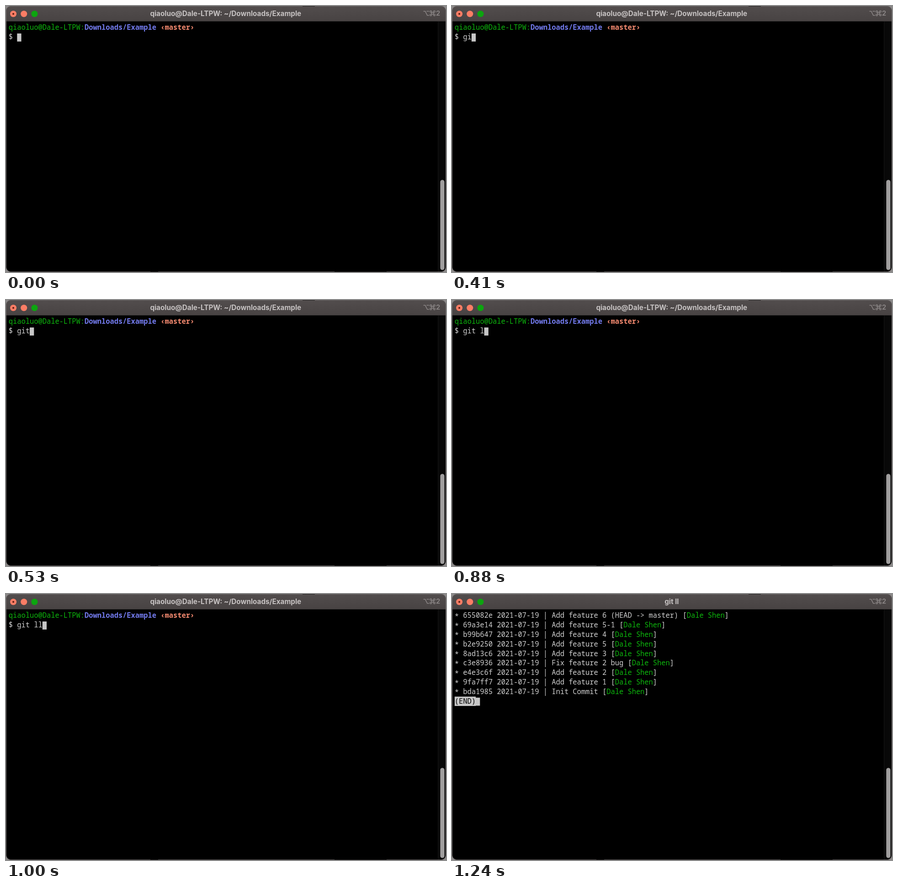
These frames come from a looping animation (963 by 582 pixels, 8000 ms). An HTML page:

```html
<!DOCTYPE html>
<html lang="en">
<head>
<meta charset="utf-8">
<title>Terminal</title>
<style>
  html, body { margin: 0; width: 100%; height: 100%; overflow: hidden; background: #8b8888; }
  svg { display: block; width: 963px; height: 582px; }
  .mono { font: 15.4px "Noto Sans Mono", "DejaVu Sans Mono", monospace; fill: #d0d0d0; white-space: pre; }
  .title { font: 700 15.25px Inter, "Liberation Sans", sans-serif; fill: #c6c2c2; text-anchor: middle; }
  .hint { font: 600 15px Inter, "Liberation Sans", sans-serif; fill: #8d8888; }
  .green { fill: #0db60d; }
  .blue { fill: #737bee; font-weight: 700; }
  .coral { fill: #f58a70; font-weight: 700; }
  .dark { fill: #000; }
  .block { fill: #c7c7c7; }
</style>
</head>
<body>
<svg viewBox="0 0 963 582">
  <defs>
    <linearGradient id="bar" x2="0" y2="1">
      <stop stop-color="#524d4d"/>
      <stop offset="1" stop-color="#484343"/>
    </linearGradient>
    <clipPath id="win"><rect x="0.5" y="0.5" width="962" height="581" rx="10"/></clipPath>
  </defs>
  <g clip-path="url(#win)">
    <rect width="963" height="582" fill="#000"/>
    <rect width="963" height="33" fill="url(#bar)"/>
    <rect y="33" width="963" height="1" fill="#2b2828"/>
    <rect x="945.5" y="34" width="1" height="548" fill="#242424"/>
    <rect x="946.5" y="34" width="16" height="548" fill="#080808"/>
  </g>
  <rect x="0.5" y="0.5" width="962" height="581" rx="10" fill="none" stroke="#686464"/>
  <path d="M649 0.5H676M316 581.5H333M719 581.5H833" stroke="#262424"/>
  <rect x="950.4" y="380.5" width="9.2" height="197" rx="4.6" fill="#a09e9e"/>
  <circle cx="16" cy="17.3" r="7" fill="#fb7d65"/>
  <circle cx="16" cy="17.3" r="2" fill="#5c1a12"/>
  <circle cx="39.2" cy="17.3" r="7" fill="#fb7d65"/>
  <circle cx="62.4" cy="17.3" r="7" fill="#0ca50f"/>
  <g fill="none" stroke="#8d8888" stroke-width="1.6">
    <path d="M913.5 11.5H917.5L922 20.5H926M920.5 11.5H926"/>
    <path d="M931.5 13.7H935.7V17.9H931.5ZM931.5 13.7H929.8A1.8 1.8 0 1 1 931.5 12ZM935.7 13.7V12A1.8 1.8 0 1 1 937.4 13.7ZM935.7 17.9H937.4A1.8 1.8 0 1 1 935.7 19.6ZM931.5 17.9V19.6A1.8 1.8 0 1 1 929.8 17.9Z" stroke-width="1.4"/>
  </g>
  <text class="hint" x="941" y="21.2">2</text>
  <text class="title" id="title" x="480.8" y="22"></text>
  <g id="screen"></g>
</svg>
<script>
const LOOP = 8000, LEFT = 5.8, COL = 9.24, ROW = 20.83;
const USER = "qiaoluo@Dale-LTPW", AUTHOR = "Dale Shen";

const title = document.getElementById("title");
const screen = document.getElementById("screen");

const span = (cls, text) => `<tspan class="${cls}">${text}</tspan>`;
const line = (row, body) =>
  `<text class="mono" x="${LEFT}" y="${(52.2 + row * ROW).toFixed(2)}">${body}</text>`;
const cursor = (col, row) =>
  `<rect class="block" x="${(LEFT + col * COL).toFixed(2)}" y="${(39.3 + row * ROW).toFixed(2)}" width="${COL}" height="17.6"/>`;

const prompt = line(0, span("green", USER + ":") + span("blue", "Downloads/Example") +
  " " + span("coral", "‹master›"));

const commits = [
  ["655082e", "Add feature 6 (HEAD -&gt; master)"],
  ["69a3e14", "Add feature 5-1"],
  ["b99b647", "Add feature 4"],
  ["b2e9250", "Add feature 5"],
  ["8ad13c6", "Add feature 3"],
  ["c3e8936", "Fix feature 2 bug"],
  ["e4e3c6f", "Add feature 2"],
  ["9fa7ff7", "Add feature 1"],
  ["bda1985", "Init Commit"]
];

function shell(typed, entered) {
  return prompt + line(1, "$ " + typed) +
    (entered ? cursor(0, 2) : cursor(2 + typed.length, 1));
}

function log() {
  const rows = commits.map(([hash, note], i) =>
    line(i, `<tspan dy="2.6">*</tspan><tspan dy="-2.6"> ${hash}</tspan> 2021-07-19 | ${note} [${span("green", AUTHOR)}]`));
  const end = '<rect class="block" x="5.8" y="224.5" width="46.2" height="20.5"/>' +
    line(9, span("dark", "(END)")) + cursor(5, 9);
  return rows.join("") + end;
}

const home = USER + ": ~/Downloads/Example";
const steps = [
  [0, home, shell("")],
  [350, home, shell("g")],
  [410, home, shell("gi")],
  [530, home, shell("git")],
  [650, home, shell("git ")],
  [880, home, shell("git l")],
  [1000, home, shell("git ll")],
  [1180, home, shell("git ll", true)],
  [1240, "git ll", log()]
];

let shown = null;
function draw(now) {
  const t = now % LOOP;
  const step = steps.findLast(s => s[0] <= t) || steps[0];
  if (step !== shown) {
    shown = step;
    title.textContent = step[1];
    screen.innerHTML = step[2];
  }
}

const start = performance.now();
function tick() {
  draw(performance.now() - start);
  requestAnimationFrame(tick);
}
tick();
</script>
</body>
</html>
```
